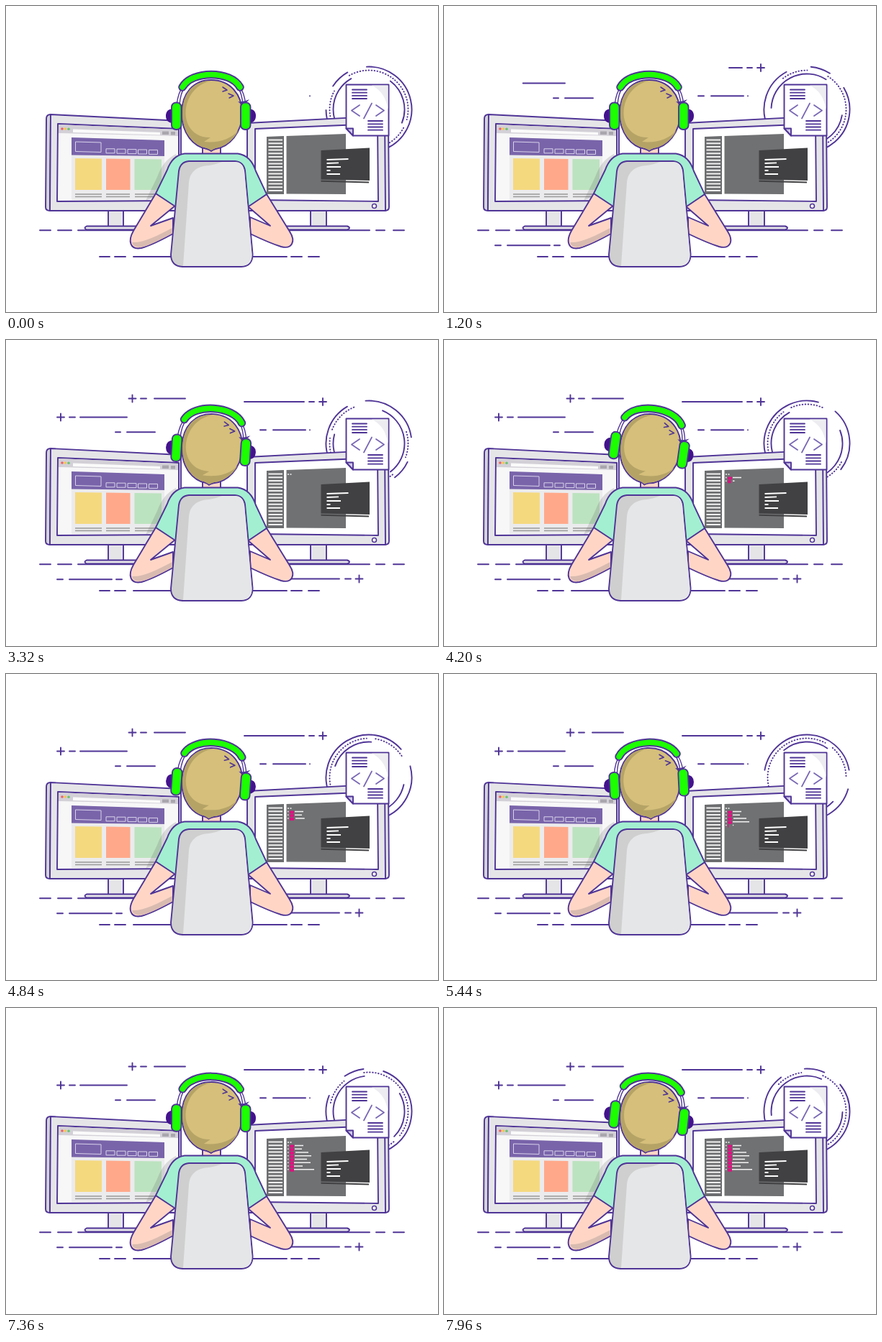
An HTML page that plays this animation: 600 px wide and 426 px high, repeating every 8 s.

```html
<!DOCTYPE html>
<html lang="en">
<head>
<meta charset="utf-8">
<title>Developer at work</title>
<style>
html, body { margin: 0; width: 100%; height: 100%; overflow: hidden; background: #fff; }
svg { display: block; width: 100vw; height: 100vh; }
.ink { stroke: #4f3496; stroke-width: 1.9; stroke-linecap: round; stroke-linejoin: round; }
.line { fill: none; }
.case { fill: #e5e5e8; }
.side { fill: #d3d3d7; }
.skin { fill: #ffd6c6; }
.shirt { fill: #a3efd1; }
.green { fill: #1cff00; }
</style>
</head>
<body>
<svg viewBox="0 0 600 426" preserveAspectRatio="none">
  <path id="trails" class="ink line"/>
  <path class="ink line" d="M47 312.300H62M72 312.300H91M100 312.300H182M390 312.300H505M514 312.300H526M538 312.300H553M130 349H144M151 349H166M177 349H229M343 349H390M396 349H411M420 349H435"/>

  <path id="ring" class="ink line"/>
  <path id="dots" class="ink line" stroke-dasharray=".6 3.400"/>

  <!-- left monitor -->
  <path class="ink case" d="M142 284V307H163V284Z"/>
  <path class="ink case" d="M112 306.500H200V311.500H112Q107 309 112 306.500Z"/>
  <path class="ink side" d="M62 151Q56 151 56 157L55 280Q55 285 61 285Z"/>
  <path class="ink case" d="M62 151L243 160V285H61Z"/>
  <path fill="#f7f7f8" class="ink" d="M72 164L240 171V271L71 272Z"/>
  <path fill="#d3d0d7" d="M73 165L239 172V181L73 177Z"/>
  <path fill="#fafafa" d="M93 171.500L214 176V179.500L93 176Z"/>
  <path fill="#a9a6ae" d="M217 174.500h9v4.500h-9zM229 175h6v4.500h-6z"/>
  <circle cx="78" cy="171" r="1.800" fill="#f0605c"/>
  <circle cx="82.500" cy="171" r="1.800" fill="#f3c64e"/>
  <circle cx="87" cy="171.300" r="1.800" fill="#69c276"/>
  <path fill="#ebebed" d="M91 183L220 187V269L91 270Z"/>
  <path fill="#7964aa" d="M91 183L220 187V209L91 207.500Z"/>
  <path class="line" stroke="#d9d3ea" d="M96.500 189L132 190V203.500L96.500 202.500Z"/>
  <path id="tabs" class="line" stroke="#d9d3ea"/>
  <path fill="#f5d97f" d="M96 212L133 212.500V256H96Z"/>
  <path fill="#ffa98a" d="M139 212.500L172.500 213V256H139Z"/>
  <path fill="#bce3bf" d="M178.500 213L216 213.500V256H178.500Z"/>
  <path stroke="#999" stroke-width="1.500" d="M96 262H133M96 265.500H133M139 262H172M139 265.500H172M179 262H216M179 265.500H216"/>

  <!-- right monitor -->
  <path class="ink case" d="M423 284V307H445V284Z"/>
  <path class="ink case" d="M386 306.500H474Q480 309 474 311.500H386Z"/>
  <path class="ink case" d="M526 153Q531 153 531 159L532 280Q532 285 526 285Z"/>
  <path class="ink case" d="M335 163L526 153L527 285H335Z"/>
  <path class="ink" fill="#fff" d="M346 171L516 164L517 272L346 270Z"/>
  <circle class="ink" cx="511.500" cy="278.500" r="3" fill="#fff" style="stroke-width:1.6"/>
  <path fill="#6c6d6f" d="M362 182L386 181V262H362Z"/>
  <path id="sidebar" stroke="#f1f1f1" stroke-width="2"/>
  <path fill="#707173" d="M389.500 181L472 178V262L389.500 261.500Z"/>
  <path id="pinks" stroke="#d8157f" stroke-width="4"/>
  <path id="code" stroke="#f3f3f3" stroke-width="1.700"/>
  <path fill="#414143" d="M437.500 201L505 197.500V243L437.500 241.500Z"/>
  <path stroke="#414143" stroke-width="2" d="M437.500 243.800L504 245.500"/>
  <path stroke="#fff" stroke-width="1.800" d="M445.500 214L475.500 213M445.500 219L462 218.300M445.500 224H465M445.500 229H450.500M445.500 234H464"/>

  <!-- document -->
  <path class="ink" fill="#fff" d="M472.500 109.500H531.500V180.500H482L472.500 170.500Z"/>
  <path fill="#ededf1" d="M508 110.500H530.500V144Q527 120 508 110.500Z"/>
  <path class="ink" fill="#cfc8e6" d="M472.500 170.500H482V180.500Z"/>
  <path class="ink line" style="stroke-width:1.8" d="M481 116.500H501M481 120.700H501M481 124.900H501M481 129H501M503 160H523M503 164.300H523M503 168.500H523M503 172.700H523"/>
  <path class="ink line" style="stroke:#7766b4;stroke-width:1.7" d="M491 138L480 145.500L491 153M508 135.500L497 156.500M514 138L525 145.500L514 153"/>

  <!-- person -->
  <path fill="#55555c" opacity=".18" d="M236 206Q218 215 210 238L194 271L214 262L240 215Z"/>
  <path class="ink skin" d="M208 261L177 313C169 327 172 340 188 337Q203 333 232 317V295L201 306L235 278Z"/>
  <path fill="#cdb2a8" opacity=".75" d="M175 329C190 330 210 320 231 309V316Q204 332 188 335.500Q177 337 175 329Z"/>
  <path class="ink skin" d="M362 262L394 314C403 328 397 339 382 335Q366 330 339 317V294L367 306L336 279Z"/>
  <path class="ink skin" d="M273 190V208H298V190Z"/>
  <path class="ink shirt" d="M248 205.500H322Q340 208 347 230L362 262L337 279H235L208 261L224 228Q231 208 248 205.500Z"/>

  <g id="head">
    <path class="ink line" d="M237 138Q239 120 246 112M241 138Q242 122 248 113M333 138Q331 120 324 112M329 138Q328 122 322 113" style="stroke-width:1.4"/>
    <path fill="#43138c" d="M233 143Q222 143 222 153T233 163ZM336 143Q347 143 347 153T336 163Z"/>
    <path class="ink" fill="#d5bf7b" d="M285 103C311 103 328 123 328 149C328 177 310 196 291 199Q287 200 285 202Q283 200 279 199C260 196 244 177 244 149C244 122 260 103 285 103Z"/>
    <path fill="#b5a366" d="M284 104C260 104 245 122 245 149C245 177 261 195 279 198L285 201L291 198C304 196 316 187 323 173C312 186 294 191 275 189L284 183C238 184 238 116 284 104Z"/>
    <path class="ink line" d="M301 113L307 117L301 119M309 122L316 125L310 128" style="stroke-width:1.6"/>
    <path fill="#4f3496" d="M322 133Q330 134 338 130Q333 136 328 138Z"/>
    <path class="ink line" style="stroke-width:11.500" d="M245 113C258 89.500 312 89.500 325 113"/>
    <path class="ink line" style="stroke-width:7.500;stroke:#1cff00" d="M245 113C258 89.500 312 89.500 325 113"/>
    <rect class="ink green" x="230" y="134.500" width="13.500" height="37.500" rx="6"/>
    <rect class="ink green" x="326" y="134.500" width="13.500" height="37.500" rx="6"/>
  </g>

  <!-- chair -->
  <path fill="#cfcfcf" class="ink" d="M254 216H318Q330 217 332 229L342.500 345Q343 362 327 363H245Q229 362 229 346L240 230Q242 217 254 216Z"/>
  <path fill="#e5e6e8" d="M282 222C262 223 255 234 254 246L246 362H327Q342 361 341.500 346L331 230Q329 217 318 217H300Q290 221 282 222Z"/>
</svg>
<script>
const LOOP = 8000;
const $ = id => document.getElementById(id);
const setPath = (id, d) => $(id).setAttribute('d', d);
const clamp = v => Math.max(0, Math.min(1, v));

const tabs = [139, 154, 169, 183.5, 198.5];
setPath('tabs', tabs.map((x, i) => `M${x} ${198.8 + i * .4}h12v6h-12z`).join(''));
setPath('sidebar', Array.from({ length: 16 }, (_, i) =>
  `M364.500 ${186.5 + i * 4.7}H384`).join(''));

// Angles run clockwise from the top.
function arc(r, from, to) {
  const at = a => {
    const q = a * Math.PI / 180;
    return `${504 + r * Math.sin(q)} ${144 - r * Math.cos(q)}`;
  };
  return `M${at(from)}A${r} ${r} 0 ${to - from > 180 ? 1 : 0} 1 ${at(to)}`;
}
setPath('ring', arc(59.5, -3, 157) + arc(59.5, 183, 269) + arc(59.5, -57, -30) +
  arc(49.5, -150, -30) + arc(49.5, 37, 112));
setPath('dots', arc(54.5, -30, 105) + arc(54.5, 118, 165) + arc(54.5, -100, -62));

// Each trail is revealed from right to left.
const trails = [
  { y: 125.3, start: 0, end: 600, bars: [[353, 361], [371, 416], [422, 422]] },
  { y: 333.3, start: 80, end: 820, bars: [[71, 79], [88, 147], [153, 161]] },
  { y: 128.3, start: 400, end: 1000, bars: [[152, 159], [168, 207]] },
  { y: 107.5, start: 750, end: 1500, bars: [[88, 96], [103, 168]], plus: 76 },
  { y: 86, start: 900, end: 1600, bars: [[331, 414], [421, 428]], plus: 440 },
  { y: 81.5, start: 1300, end: 2100, bars: [[187, 195], [206, 249]], plus: 175.5 },
  { y: 332.5, start: 1720, end: 2320, bars: [[393, 463], [471, 479]], plus: 490.5 }
];

function trailPath({ y, start, end, bars, plus }, t) {
  if (t < start) return '';
  const xs = bars.flat().concat(plus ? [plus - 5, plus + 5] : []);
  const left = Math.min(...xs), right = Math.max(...xs);
  const front = right - (right - left) * clamp((t - start) / (end - start));
  let d = bars.filter(b => b[1] >= front)
    .map(([a, b]) => `M${Math.max(a, front)} ${y}H${b}`).join('');
  if (plus && front < plus + 4.5) {
    d += `M${Math.max(plus - 5, front)} ${y}H${plus + 5}`;
    if (front < plus) d += `M${plus} ${y - 5}v10`;
  }
  return d;
}

const codeRows = [[401, 413], [401, 411], [402, 420], [401, 424],
  [401, 418], [400, 423], [400, 412], [400, 428]];
const ROW_START = 3650, ROW_TIME = 440;

function drawCode(t) {
  let white = t > ROW_START - ROW_TIME ? 'M391 187h2M394.500 187h2' : '';
  let pink = '';
  codeRows.forEach(([a, b], i) => {
    const p = clamp((t - ROW_START - i * ROW_TIME) / ROW_TIME);
    if (!p) return;
    const y = 191.5 + i * 4.75;
    white += `M391 ${y}h1.500M${a} ${y}H${a + (b - a) * p}`;
    pink += `M394 ${y + 1}H${394 + 6 * clamp(p * 3)}`;
  });
  setPath('code', white);
  setPath('pinks', pink);
}

const tilts = [[0, 0], [2600, 0], [4150, 8], [6250, -8], [8430, 8]];

function tilt(t) {
  const i = tilts.findIndex(k => k[0] > t);
  const [t0, a] = tilts[i - 1], [t1, b] = tilts[i];
  return a + (b - a) * (1 - Math.cos(Math.PI * (t - t0) / (t1 - t0))) / 2;
}

function render(t) {
  const spin = `rotate(${t * .052} 504 144)`;
  $('ring').setAttribute('transform', spin);
  $('dots').setAttribute('transform', spin);
  $('head').setAttribute('transform', `rotate(${tilt(t)} 285 153)`);
  setPath('trails', trails.map(l => trailPath(l, t)).join(''));
  drawCode(t);
}

const begin = performance.now();
function tick() {
  render((performance.now() - begin) % LOOP);
  requestAnimationFrame(tick);
}
render(0);
requestAnimationFrame(tick);
</script>
</body>
</html>
```
